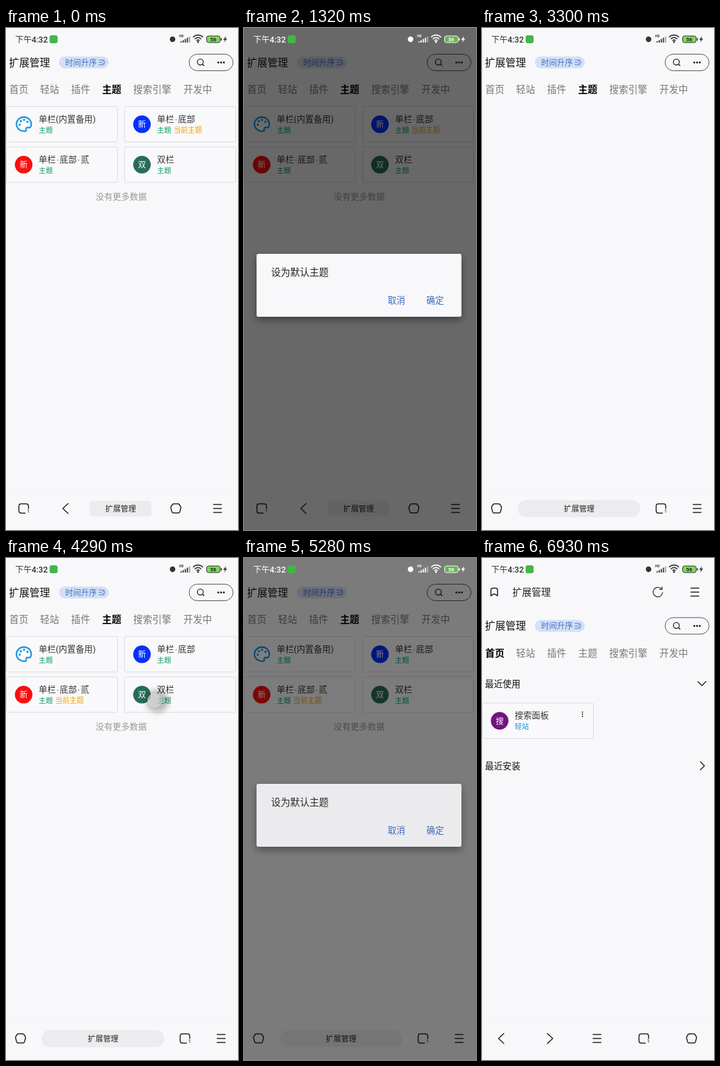
An HTML page that plays this animation: 351 by 758 pixels, repeating every 7260 ms.

```html
<!DOCTYPE html>
<html lang="zh-CN">
<head>
<meta charset="utf-8">
<style>
html, body { margin: 0; width: 100%; height: 100%; overflow: hidden; background: #f8f8fa; }
svg { display: block; width: 100%; height: 100%; }
text { font-family: Roboto, "Noto Sans CJK SC", "Noto Sans CJK", sans-serif; }
.dot { font-family: "Noto Sans Mono", monospace; font-size: 10px; }
.line { fill: none; stroke: #222; stroke-width: 1.5; stroke-linecap: round; stroke-linejoin: round; }
.thin { stroke-width: 1.15; }
</style>
</head>
<body>
<svg id="stage" viewBox="0 0 351 758" preserveAspectRatio="none"></svg>
<script>
const LOOP = 7260, STEP = 330;
const INK = '#222';

// Each row holds until the next; page: 0 home, 1 themes, 2 themes still empty
const steps = [
  { at: 0, page: 1, bar: 'A', current: 1 },
  { at: 330, touch: [84, 215, 'hold'] },
  { at: 660, touch: 0, dim: .28, menu: 84, menuAlpha: .9 },
  { at: 990, menuAlpha: 1, pressed: 2, touch: [119, 362, 'menu'] },
  { at: 1320, menu: null, pressed: -1, touch: 0, dim: .58, dialog: 1 },
  { at: 1980, touch: [295, 412, 'dialog'] },
  { at: 2310, touch: 0, dim: 0, dialog: 0, page: 0, bar: 'B', current: 2 },
  { at: 2640, touch: [147, 93, 'tap'] },
  { at: 2970, touch: 0 },
  { at: 3300, page: 2 },
  { at: 3630, page: 1 },
  { at: 3960, touch: [225, 208, 'tap'] },
  { at: 4290, touch: [225, 215, 'hold'] },
  { at: 4620, touch: 0, dim: .28, menu: 216, menuAlpha: 1 },
  { at: 4950, pressed: 3, touch: [251, 362, 'menu'] },
  { at: 5280, menu: null, pressed: -1, touch: 0, dim: .5, dialog: .9 },
  { at: 5610, dim: .58, dialog: 1 },
  { at: 5940, touch: [295, 412, 'dialog'] },
  { at: 6270, touch: 0, dim: 0, dialog: 0, page: 0, bar: 'C' }
];

const text = (x, cy, size, str, fill = INK, weight = 400, extra = '') =>
  `<text x="${x}" y="${cy + size * .38}" font-size="${size}" fill="${fill}" font-weight="${weight}" ${extra}>${str}</text>`;
const mid = 'text-anchor="middle"';
const box = (x, y, w, h, r, fill, extra = '') =>
  `<rect x="${x}" y="${y}" width="${w}" height="${h}" rx="${r}" fill="${fill}" ${extra}/>`;
const dot = (x, y, r, fill, extra = '') => `<circle cx="${x}" cy="${y}" r="${r}" fill="${fill}" ${extra}/>`;
const line = (d, cls = '', extra = '') => `<path class="line ${cls}" d="${d}" ${extra}/>`;
const at = (x, y, body, extra = '') => `<g transform="translate(${x} ${y})" ${extra}>${body}</g>`;

const icon = {
  home: line('M-3.2-7H3.2Q4.5-7 5.2-6L7.2-2.8Q7.8-1.6 7.4-.4L5.9 5.2Q5.4 6.8 4 6.8H-4Q-5.4 6.8-5.9 5.2L-7.4-.4Q-7.8-1.6-7.2-2.8L-5.2-6Q-4.5-7-3.2-7Z'),
  tabs: line('M2 7H-4Q-7.5 7-7.5 3.5V-3.5Q-7.5-7-4-7H3.5Q7-7 7-3.5V0') +
    text(4.6, 3.6, 8, '1'),
  back: line('M4-7.5L-4 0L4 7.5'),
  next: line('M-4-7.5L4 0L-4 7.5'),
  menu: line('M-6-6H6M-6 0H6M-6 6H6'),
  mark: line('M-5 5.5V-3Q-5-6-2-6H2Q5-6 5-3V5.5L0 2.6Z'),
  reload: line('M5.2-5A7.2 7.2 0 1 0 7.2 .5M6.4-8V-4H2.4', 'thin'),
  edit: line('M1-5.2H-2Q-5.5-5.2-5.5-1.7V2Q-5.5 5.5-2 5.5H2Q5.5 5.5 5.5 2V0M-1 1L5.5-5.5', 'thin'),
  theme: line('M5.5 0A5.7 5.7 0 1 0 0 5.7Q2 5.5 1.5 3.5Q1.5 2 3.5 2.2Q5.5 2.2 5.5 0Z', 'thin') +
    dot(-2.8, 0, .9, INK) + dot(-.8, -2.7, .9, INK) + dot(2.4, -2, .9, INK),
  share: `<g class="line thin"><circle cx="-3" cy="0" r="2.6"/><circle cx="3.2" cy="-2.8" r="1.9"/><circle cx="3.2" cy="3" r="1.9"/></g>`,
  code: line('M-2.5-5.5H2.5L5.5-2.5V2.5L2.5 5.5H-2.5L-5.5 2.5V-2.5ZM-2.2-2L.5 0L-2.2 2M.8 2.7H3', 'thin'),
  file: line('M-5-6H2L5-3V6H-5ZM2-6V-3H5', 'thin', 'style="stroke-width:.8"'),
  palette: `<path d="M11.2 1A11.2 10.7 0 1 0 1 10.8Q4.3 11 3.5 7.8Q3.2 4.5 7 5.5Q11 5.6 11.2 1Z" fill="#fff" stroke="#2597da" stroke-width="2.4"/>` +
    [[-6.2, 1], [-4.6, -4.2], [.3, -6.3], [5.4, -3.2]].map(p => dot(...p, 1.8, '#2597da')).join('')
};

function status(light) {
  const c = light ? '#fff' : '#333';
  const bars = [0, 1, 2, 3, 4].map(i =>
    box(264 + i * 3.2, 20 - i * 1.8, 1.8, 2 + i * 1.8, .5, c, i == 4 ? 'opacity=".45"' : '')).join('');
  const waves = [3, 6.3, 9.6].map(r => {
    const d = r * .77;
    return `M${290.5 - d} ${21.5 - d}A${r} ${r} 0 0 1 ${290.5 + d} ${21.5 - d}`;
  }).join('');
  return text(14, 17, 12.4, '下午4:32', c, 500) +
    box(66, 11, 12, 12, 3, '#42b649') +
    dot(252, 17, 4.2, c) + text(262, 12.5, 5, 'HD', c, 700) + bars +
    `<path d="${waves}" fill="none" stroke="${c}" stroke-width="1.6"/>` + dot(290.5, 21, 1.5, c) +
    box(303.5, 12, 20.5, 10, 3, light ? '#61b849' : '#7ed957', `stroke="${c}" stroke-width="1"`) +
    box(325, 15, 1.4, 4, .6, c) + text(313.6, 17.2, 7.8, '56', light ? '#fff' : '#222', 700, mid) +
    `<path d="M333 12L328.5 17.8H331.3L330 22L334.6 16H331.8Z" fill="${c}"/>`;
}

function header(page) {
  const tabs = [['首页', 5], ['轻站', 51.5], ['插件', 98.5], ['主题', 145.5], ['搜索引擎', 192.5], ['开发中', 268.5]];
  const active = page ? 3 : 0;
  return text(4.5, 52, 15.5, '扩展管理', '#111', 500) +
    box(80, 43, 75.5, 18, 9, '#d4e0f6') + text(89.5, 52, 12, '时间升序', '#416fc4') +
    line('M140.5 48.3H148.5M140.5 52H145M140.5 55.6H148.5M146 50.2H149.2V53.6H146', '', 'style="stroke:#416fc4;stroke-width:.9"') +
    box(277, 39.5, 66.5, 25, 12.5, 'none', 'stroke="#555"') +
    `<circle class="line" cx="294" cy="51.3" r="4.5" style="stroke-width:1.3"/>` + line('M297.4 54.7L299.5 56.8') +
    [321.2, 325.4, 329.6].map(x => dot(x, 52, 1.5, INK)).join('') +
    tabs.map(([s, x], i) => text(x, 93, 14.4, s, i == active ? '#000' : '#777', i == active ? 700 : 400)).join('');
}

function card(x, y, name, color, tag, tagColor, glyph, o = {}) {
  const title = name.replace(/·/g, '<tspan class="dot">·</tspan>');
  return at(x, y,
    box(.5, .5, 168, 53.5, 2, o.pressed ? '#ececee' : '#f9f9fb', 'stroke="#dcdcdf"') +
    (glyph ? dot(26.7, 27.3, 13.3, color) + text(26.7, 27.5, 12, glyph, '#fff', 400, mid) : at(27, 27, icon.palette)) +
    text(49.5, 19, 12.9, title, '#333') +
    text(49.5, 35.5, 10.7, tag, tagColor) +
    (o.current ? text(74.5, 35.5, 10.8, '当前主题', '#f0a30a') : '') +
    (o.more ? [14.2, 17.5, 20.8].map(d => dot(152, d, 1, INK)).join('') : ''));
}

function themes(s) {
  const list = [['单栏(内置备用)', '', ''], ['单栏·底部', '#0530ff', '新'], ['单栏·底部·贰', '#fb0d0d', '新'], ['双栏', '#296b58', '双']];
  return list.map(([name, color, glyph], i) =>
    card(i % 2 * 179, i < 2 ? 118 : 179, name, color, '主题', '#0b9d62', glyph,
      { current: s.current == i, pressed: s.pressed == i })).join('') +
    text(135.5, 254, 12.9, '没有更多数据', '#999');
}

const recent = () =>
  text(4.5, 139, 13.4, '最近使用', '#111', 500) + line('M326.8 136.3L332.7 142.2L338.6 136.3') +
  card(0, 168, '搜索面板', '#70147e', '轻站', '#158fd8', '搜', { more: 1 }) +
  text(4.5, 263.5, 13.4, '最近安装', '#111', 500) + line('M330.5 257.2L336.5 263.2L330.5 269.2');

function bottom(kind) {
  const sets = {
    A: [['tabs', 27], ['back', 90], ['home', 257], ['menu', 320]],
    B: [['home', 22], ['tabs', 271], ['menu', 325.5]],
    C: [['back', 29], ['next', 103], ['menu', 174], ['tabs', 245], ['home', 317]]
  };
  const pill = {
    A: box(127, 714, 93, 23.5, 4, '#ececee') + text(173.5, 726, 11.6, '扩展管理', INK, 400, mid),
    B: box(54, 713, 185.5, 25.5, 12.7, '#ececee') + text(147, 726, 11.6, '扩展管理', INK, 400, mid),
    C: ''
  };
  return box(0, 700, 351, 1, 0, '#f1f1f3') + pill[kind] + sets[kind].map(([n, x]) => at(x, 725.5, icon[n])).join('');
}

const topBar = () =>
  at(18.5, 51.5, icon.mark) + text(46, 51.5, 14.5, '扩展管理') + at(266, 51.5, icon.reload) + at(322, 51.5, icon.menu);

function menu(x, alpha) {
  const items = [['编辑', 'edit'], ['分组', 'mark'], ['克隆'], ['设为默认主题', 'theme'], ['分享', 'share'],
    ['生成口令', 'code'], ['生成EON'], ['导出文件', 'file'], ['删除']];
  return at(x, 208,
    box(0, 0, 136, 371, 5, '#fafafc') +
    box(0, 123, 136, 1, 0, '#e4e4e7') + box(0, 206, 136, 1, 0, '#e4e4e7') +
    items.map(([s, n], i) => {
      const y = 20.3 + i * 41.33;
      return (n ? at(20.8, y, icon[n]) : '') + text(39, y, 13.5, s);
    }).join(''), `opacity="${alpha}"`);
}

const dialog = alpha => `<g opacity="${alpha}">` +
  box(19, 341, 310, 95, 3, '#f8f8fb', 'filter="url(#shade)"') +
  text(41, 368, 14.5, '设为默认主题') +
  text(217.5, 411, 13.2, '取消', '#3c66bd', 500) + text(276, 411, 13.2, '确定', '#3c66bd', 500) + '</g>';

function touch([x, y, kind]) {
  if (kind == 'hold')
    return dot(x + 4, y + 1, 17, '#000', 'opacity=".26" filter="url(#blur)"') +
      dot(x, y, 10.5, '#ddd', 'fill-opacity=".6" stroke="#ccc"');
  const fill = kind == 'tap' ? '#ddd' : '#fff';
  const ring = kind == 'tap' ? '#bbb' : '#c9c9e6';
  return dot(x, y, 10.5, fill, `fill-opacity=".5" stroke="${ring}" stroke-width="1.3"`);
}

const defs = `<defs><filter id="blur" x="-50%" y="-50%" width="200%" height="200%"><feGaussianBlur stdDeviation="4"/></filter>
<filter id="shade" x="-10%" y="-20%" width="120%" height="150%"><feDropShadow dx="0" dy="5" stdDeviation="6" flood-opacity=".4"/></filter></defs>`;

function scene(s) {
  const page = header(s.page) + (s.page == 0 ? recent() : s.page == 1 ? themes(s) : '');
  return defs + box(0, 0, 351, 758, 0, '#f8f8fa') +
    (s.bar == 'C' ? topBar() + at(0, 50.5, page) : page) + bottom(s.bar) +
    (s.dim ? box(0, 0, 351, 758, 0, '#000', `opacity="${s.dim}"`) : '') + status(s.dim) +
    (s.menu != null ? menu(s.menu, s.menuAlpha) : '') +
    (s.dialog ? dialog(s.dialog) : '') + (s.touch ? touch(s.touch) : '');
}

const stage = document.getElementById('stage');
const start = performance.now();
let shown = -1;

function tick() {
  const t = (performance.now() - start) % LOOP;
  const n = Math.floor(t / STEP);
  if (n != shown) {
    shown = n;
    stage.innerHTML = scene(Object.assign({}, ...steps.filter(s => s.at <= n * STEP)));
  }
  requestAnimationFrame(tick);
}
tick();
</script>
</body>
</html>
```
